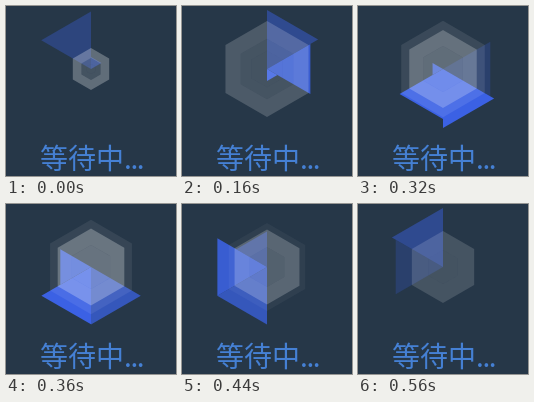
An HTML page with a canvas for the animation above (0.6 s loop, 170x170 px).

```html
<!DOCTYPE html>
<html lang="zh-CN">
<head>
<meta charset="utf-8">
<style>
  html, body { margin: 0; width: 100%; height: 100%; overflow: hidden; background: #263748; }
  canvas, svg { position: absolute; left: 0; top: 0; }
  text { font: 28px "Noto Sans CJK SC", "Noto Sans CJK", sans-serif; fill: #4580d4; }
</style>
</head>
<body>
<canvas width="170" height="170"></canvas>
<svg width="170" height="170">
  <text x="34" y="163">等待中<tspan letter-spacing="-1.4">...</tspan></text>
</svg>
<script>
const ctx = document.querySelector('canvas').getContext('2d');
const LOOP = 600, STEP = 40, CX = 85, CY = 63, R = 59;
const WEDGE_DELAY = 80, GROW = 176, FADE = 120;

const clamp = v => Math.min(1, Math.max(0, v));
const smooth = v => v * v * (3 - 2 * v);
const easeOut = (v, power) => 1 - (1 - v) ** power;
const bump = (t, center, width) => Math.exp(-(((t - center) / width) ** 2));

// Corner 0 points up, the rest follow clockwise
function corner(i, r) {
  const angle = (i * 60 - 90) * Math.PI / 180;
  return [CX + r * Math.cos(angle), CY + r * Math.sin(angle)];
}

function addHexagon(path, r) {
  for (let i = 0; i < 6; i++) path.lineTo(...corner(i, r));
  path.closePath();
}

// Each wedge shoots out of the center, then fades; the first and last are dimmer
function drawWedge(i, t) {
  const age = (t - i * WEDGE_DELAY + 16 + LOOP) % LOOP;
  const visible = 1 - smooth(clamp((age - GROW) / FADE));
  const radius = R * easeOut(clamp(age / GROW), 2.4) * (0.9 + 0.1 * visible);
  const peak = 0.45 + 0.55 * Math.sqrt(Math.sin(Math.PI * i / 5) + 1e-9);
  ctx.globalAlpha = peak * visible;
  ctx.beginPath();
  ctx.moveTo(CX, CY);
  ctx.lineTo(...corner(i, radius));
  ctx.lineTo(...corner(i + 1, radius));
  ctx.fill();
}

function drawBand(outer, inner, alpha) {
  const band = new Path2D();
  addHexagon(band, outer);
  if (inner) {
    band.moveTo(...corner(0, inner));
    addHexagon(band, inner);
  }
  ctx.globalAlpha = alpha;
  ctx.fill(band, 'evenodd');
}

// Three nested hexagons expand, merge into one bright shape and shrink
function drawHexagons(t) {
  const grow = clamp(t / 240), settle = clamp((t - 240) / 320);
  const outer = 21 + 28 * easeOut(grow, 3) - 12.5 * settle ** 2;
  const middle = 11 + 29 * grow - 4 * settle;
  const core = 5 + 20 * grow - 8 * settle;
  drawBand(outer, middle, 0.27 * (1 - t / LOOP) ** 1.4);
  drawBand(middle, core, 0.14 + 0.17 * bump(t, 360, 110));
  drawBand(core, 0, 0.14 + 0.16 * bump(t, 360, 90));
}

function draw(t) {
  ctx.clearRect(0, 0, 170, 170);
  ctx.fillStyle = '#3c63e6';
  for (let i = 0; i < 6; i++) drawWedge(i, t);
  ctx.fillStyle = '#fff';
  drawHexagons(t);
}

function tick() {
  const t = performance.now() % LOOP;
  draw(Math.floor(t / STEP) * STEP);
  requestAnimationFrame(tick);
}
tick();
</script>
</body>
</html>
```
